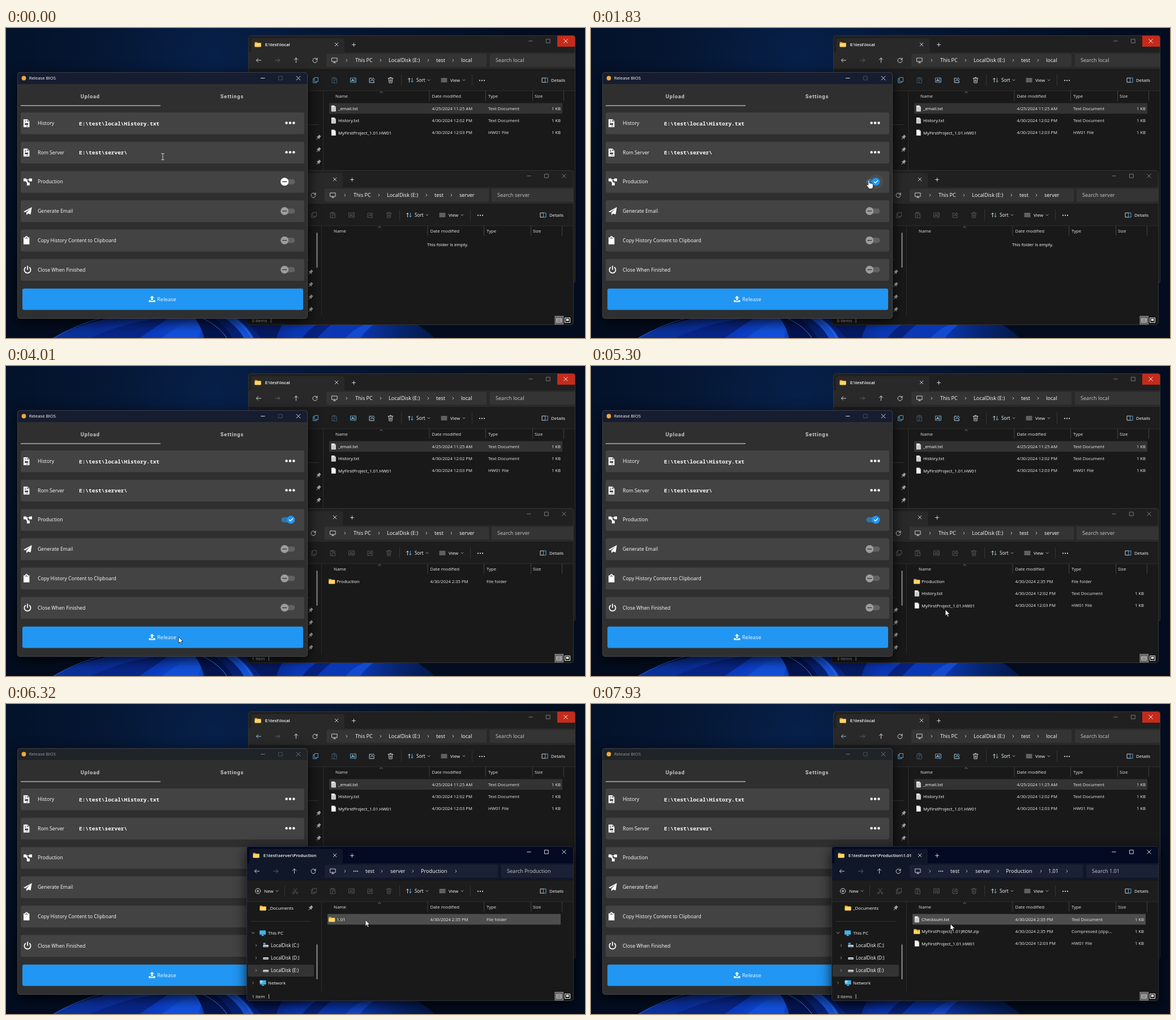
Animation, 1023 px wide and 547 px high, one loop 8000 ms. Source, as an HTML page:

```html
<!DOCTYPE html>
<html lang="en">
<head>
<meta charset="utf-8">
<title>Release tool</title>
<style>
html, body { margin: 0; width: 100%; height: 100%; overflow: hidden; background: #030c1c; }
svg { display: block; width: 1023px; height: 547px; }
text { font-family: "Open Sans", "Noto Sans", sans-serif; white-space: pre; }
.mono { font-family: "Noto Sans Mono", "DejaVu Sans Mono", monospace; font-weight: 600; }
.tab { font-family: Roboto, sans-serif; font-weight: 600; letter-spacing: .8px; }
.title { font-weight: 600; }
.shadow { filter: drop-shadow(0 6px 11px rgba(0,0,0,.8)); }
</style>
</head>
<body>
<svg viewBox="0 0 1023 547" xmlns="http://www.w3.org/2000/svg">
  <defs>
    <radialGradient id="sky" gradientUnits="userSpaceOnUse" cx="370" cy="50" r="560">
      <stop offset="0" stop-color="#07204a"/><stop offset=".35" stop-color="#051734"/><stop offset="1" stop-color="#030d1f"/>
    </radialGradient>
    <linearGradient id="bloom" gradientUnits="userSpaceOnUse" x1="85" y1="0" x2="755" y2="0">
      <stop offset="0" stop-color="#0b349c"/><stop offset=".12" stop-color="#0a2f9c"/><stop offset=".27" stop-color="#0b3dc6"/>
      <stop offset=".37" stop-color="#1150dc"/><stop offset=".44" stop-color="#06206e"/><stop offset=".52" stop-color="#06227c"/>
      <stop offset=".64" stop-color="#0a38b8"/><stop offset=".8" stop-color="#0a38b4"/><stop offset=".9" stop-color="#062674"/><stop offset="1" stop-color="#04184a"/>
    </linearGradient>
  </defs>
  <rect width="1023" height="547" fill="url(#sky)"/>
  <g id="petals"></g>
  <g id="local"></g>
  <g id="windows"><g id="server"></g><g id="app"></g></g>
  <circle id="click" r="8.6" fill="#e1dc00" fill-opacity=".56"/>
  <g id="cursor" stroke-linejoin="round"></g>
</svg>
<script>
const $ = id => document.getElementById(id);
const LOOP = 8000;
const clamp = v => Math.max(0, Math.min(1, v));

// Drawing helpers; all return SVG markup.
const rect = (x, y, w, h, fill, r = 0, extra = '') =>
  `<rect x="${x}" y="${y}" width="${w}" height="${h}" rx="${r}" fill="${fill}" ${extra}/>`;
const text = (x, y, s, size = 7.8, fill = '#fff', extra = '') =>
  `<text x="${x}" y="${y}" font-size="${size}" fill="${fill}" ${extra}>${s}</text>`;
const line = (x, y, d, color = '#e4e4e4', w = .9) =>
  `<path transform="translate(${x} ${y})" d="${d}" fill="none" stroke="${color}" stroke-width="${w}" stroke-linecap="round" stroke-linejoin="round"/>`;
const solid = (x, y, d, fill = '#fff') =>
  `<path transform="translate(${x} ${y})" d="${d}" fill="${fill}" fill-rule="evenodd"/>`;
const dots = (x, y, gap, r, fill = '#f0f0f0') =>
  [-gap, 0, gap].map(d => `<circle cx="${x + d}" cy="${y}" r="${r}" fill="${fill}"/>`).join('');

const cross = (x, y, s, c) => line(x, y, `M${-s} ${-s}L${s} ${s}M${s} ${-s}L${-s} ${s}`, c);
const right = (x, y, c, s = 2) => line(x, y, `M${-s / 2} ${-s}L${s / 2} 0L${-s / 2} ${s}`, c);
const down = (x, y, c = '#bbb', s = 2) => line(x, y, `M${-s} ${-s / 2}L0 ${s / 2}L${s} ${-s / 2}`, c, .8);
const folder = (x, y) =>
  solid(x, y, 'M-5.5-4.3H-1.6L-.3-3H5.5V4H-5.5Z', '#e3a136') + rect(x - 5.5, y - 2, 11, 6.4, '#ffd666', .8);
const page = (x, y, lines) =>
  solid(x, y, 'M-3.8-5.2H1.6L4-2.8V5.2H-3.8Z', '#f4f4f4') + line(x, y, 'M1.6-5.2V-2.8H4', '#999', .6) +
  (lines ? line(x, y, 'M-2.3-1.4H2.4M-2.3.3H2.4M-2.3 2H2.4M-2.3 3.6H2.4', '#8b8b8b', .7) : '');
const zip = (x, y) => folder(x, y) + line(x + 2, y, 'M0-3V0', '#8a6a24', 1.1);
const pin = (x, y) =>
  `<g transform="translate(${x} ${y}) rotate(42) scale(1.15)">` +
  solid(0, 0, 'M-1.8-3.8H1.8V-.8L3 1H-3L-1.8-.8Z', '#a2a2a2') + line(0, 0, 'M0 1V3.8', '#a2a2a2', .9) + '</g>';
const monitor = (x, y, c = '#ddd') => line(x, y, 'M-4.6-4H4.6V2.2H-4.6ZM-2 4.2H2M0 2.4V4', c, .9);
const screen = (x, y) => rect(x - 5.5, y - 4.5, 11, 7.6, '#3fb2ea', .8) + line(x, y, 'M-2 4.6H2M0 3V4.5', '#9ecbe2', 1);
const drive = (x, y, system) =>
  rect(x - 4.8, y - 1, 9.6, 4, '#d8dde0', 1) + rect(x - 3.6, y + 1, 7.2, .8, '#444') +
  (system ? rect(x - 4.5, y - 4.6, 4.2, 3, '#37a9ee') : '');

const PETALS = [
  ['M84 547C125 524 190 503 300 498L690 505C728 522 748 537 757 547Z', 'url(#bloom)'],
  ['M150 547C190 527 240 515 290 510L236 547Z', '#08268a'],
  ['M276 547C305 524 325 514 350 508L340 547Z', '#1250dc'],
  ['M350 547C346 530 340 520 332 510H366C382 522 394 535 400 547Z', '#041450'],
  ['M384 510C402 522 414 535 420 547H438C430 532 418 520 404 510Z', '#1552d8'],
  ['M450 547C440 534 430 524 420 514H494C486 526 480 538 478 547Z', '#051a62'],
  ['M524 547C534 533 544 525 560 518H582C566 530 556 540 550 547Z', '#07227c'],
  ['M600 547C610 536 622 527 642 520H654C640 530 630 540 626 547Z', '#134ad0']
];
$('petals').innerHTML = PETALS.map(([d, f]) => solid(0, 0, d, f)).join('') +
  line(0, 0, 'M84 547C108 533 138 520 172 511', '#1f5ae8', 1.2) +
  line(0, 0, 'M342 510C366 520 382 534 390 547M398 510C414 520 428 534 434 547', '#3b86f5', 1);

// An Explorer window, laid out at the place of the lower one.
const INACTIVE = { bar: '#202020', nav: '#292929', box: '#343434', ctl: '#858585', edge: '#3c3c3c' };
const ACTIVE = { bar: '#030a22', nav: '#101729', box: '#1a2135', ctl: '#f2f2f2', edge: '#343a4c' };

function commands(live) {
  const dim = '#5c5c5c', ink = live ? '#dedede' : dim, blue = live ? '#67b7ea' : dim;
  const y = 330;
  const arrow = 'M0-3.6V3.6';
  return line(445, y, 'M-4.6 0A4.6 4.6 0 1 1 4.6 0A4.6 4.6 0 1 1-4.6 0M-2.2 0H2.2M0-2.2V2.2') +
    text(456, 333, 'New', 8) + down(479, y) + rect(492, 320, .8, 20, '#3c3c3c') +
    line(511, y, 'M-3-4.6L1.8 2.4M3-4.6L-1.8 2.4M-1.6 3.4A1.6 1.6 0 1 1-4.8 3.4A1.6 1.6 0 1 1-1.6 3.4M4.8 3.4A1.6 1.6 0 1 1 1.6 3.4A1.6 1.6 0 1 1 4.8 3.4', dim) +
    line(544, y, 'M-1.8-4.6H4.4V2.4H-1.8ZM-2-2.4H-4.4V4.6H1.8V2.6', blue) +
    line(577, y, 'M-1.6-3.6H-4V4.8H-.6M1.6-3.6H4V-1M-1.6-4.8H1.6V-2.8H-1.6ZM0-.4H4.4V5H0Z', live ? '#3f6178' : dim) +
    line(610.5, y, 'M1-3.8H-5V3.8H1M4-3.8H5V3.8H4M2.6-5V5', blue) + line(610.5, y, 'M-3 2L-1 -2L1 2M-2.3.7H.3', ink) +
    line(643.5, y, 'M-.5-3.4H-4.4V4.4H3.8V2', ink) + line(643.5, y, 'M-2 1.5C-1.6-1 0-2 2-2V-4.4L5-1.2L2 2V-.2C.4-.2-1 .3-2 1.5Z', blue) +
    line(676.5, y, 'M-4.4-3.4H4.4M-3.4-3.4L-2.6 4.8H2.6L3.4-3.4M-1.2-3.4V-4.8H1.2V-3.4M-.9-1V2.6M.9-1V2.6', ink) +
    rect(695, 320, .8, 20, '#3c3c3c') +
    line(709.5, y, arrow + 'M-2-1.6L0-3.6L2-1.6') + line(714.5, y, arrow + 'M-2 1.6L0 3.6L2 1.6', '#67b7ea') +
    text(722, 333, 'Sort', 8.2) + down(744, y) +
    line(771, y, 'M-5-3H5M-5-1H5M-5 1H5M-5 3H5', '#dedede', .7) + text(782, 333, 'View', 7.9) + down(806, y) +
    rect(820, 320, .8, 20, '#3c3c3c') + dots(838, 330.5, 4, 1.1) +
    line(949, y, 'M.6-3.8H-5V3.8H.6') + line(949, y, 'M1-3.8H5V3.8H1Z', '#67b7ea') + text(960, 333, 'Details', 7.9);
}

const ICONS = { folder, zip, txt: (x, y) => page(x, y, true), file: (x, y) => page(x, y, false) };

function fileRow([kind, name, date, type, size = ''], i) {
  const y = 380 + i * 21.3;
  return ICONS[kind](575.7, y) + text(584, y + 2.9, name, kind === 'folder' ? 7.95 : 7.75) +
    text(749.5, y + 2.8, date, 7.67, '#ececec') + text(849, y + 2.8, type, 7.8, '#ececec') +
    text(977, y + 2.8, size, 7.7, '#ececec', 'text-anchor="end"');
}

function quickSide(pinX) {
  const names = ['Desktop', 'Downloads', 'Documents', 'Pictures'];
  return text(463, 363, 'Home', 7.8) + screen(453, 360) + text(463, 385, 'Gallery', 7.8) + screen(453, 382) +
    rect(431, 408, pinX - 431, .8, '#3a3a3a') +
    names.map((n, i) => folder(453, 431 + i * 22) + text(463, 434 + i * 22, n, 7.8) + pin(pinX, 431 + i * 22)).join('');
}

function treeSide() {
  const disks = ['C', 'D', 'E'].map((d, i) => {
    const y = 426 + i * 22;
    return right(442, y, '#999') + drive(459, y, !i) + text(468, y + 3, `LocalDisk (${d}:)`, 8.1);
  });
  return folder(454, 360) + text(463, 363, '_Documents', 7.75) + pin(538, 360) +
    rect(432, 383, 106, .8, '#3a3a3a') + rect(427, 460, 117, 21, '#333', 2) +
    down(436.5, 404, '#ccc', 2.4) + screen(453.5, 404) + text(463, 407, 'This PC', 7.95) + disks.join('') +
    right(436.5, 492, '#999') + screen(454, 492) + `<circle cx="451" cy="490" r="2.6" fill="#8fd8ff"/>` +
    text(463, 495, 'Network', 7.8);
}

function explorer(o) {
  const c = o.active ? ACTIVE : INACTIVE, ctl = c.ctl;
  const bottom = 251 + o.h;
  const chev = o.chev.map(x => right(x, 295, '#ccc')).join('');
  const heads = [[579, 'Name'], [749.5, 'Date modified'], [849, 'Type'], [931, 'Size']];
  return rect(425, 251, 578, o.h, '#191919', 5, o.active ? 'class="shadow"' : '') +
    solid(0, 0, 'M425 282V256Q425 251 430 251H998Q1003 251 1003 256V282Z', c.bar) +
    (o.danger ? solid(0, 0, 'M971 251H998Q1003 251 1003 256V271H971Z', '#c42b1c') : '') +
    solid(0, 0, 'M430 282V260Q430 256 434 256H591Q595 256 595 260V282Z', c.nav) + rect(425, 281, 578, 30, c.nav) +
    rect(425, 311, 578, 38, '#1d1d1d') + rect(425, 310.6, 578, .8, '#161616') + rect(425, 348.4, 578, .8, '#333') +
    folder(442, 267) + text(454.7, 270.2, o.title, 7.7, '#fff', 'class="title"') + cross(581, 267, 2.8, '#e4e4e4') +
    line(611.5, 267.5, 'M-3 0H3M0-3V3') +
    line(924, 261, 'M-3.3 0H3.3', ctl) + line(955, 261, 'M-3.2-3.2H3.2V3.2H-3.2Z', ctl) + cross(986, 261, 3.3, o.danger ? '#fff' : ctl) +
    line(443.5, 295, 'M4 0H-4M-1-3.2L-4.2 0L-1 3.2', o.back) + line(476.5, 295, 'M-4 0H4M1-3.2L4.2 0L1 3.2', '#666') +
    line(509.5, 295, 'M0 4V-4M-3.2-1L0-4.2L3.2-1') +
    line(543, 295, 'M3.8-1.2A4 4 0 1 0 4 .8M4-4V-1.2H1.2', o.refresh) +
    rect(563, 283.5, o.end - 563, 23, c.box, 2) + rect(o.find, 283.5, 1003 - o.find, 23, c.box, 2) +
    monitor(577.5, 295) + chev + (o.more ? dots(618, 295, 3.2, .9) : '') +
    o.crumbs.map(([x, s]) => text(x, 298.3, s, 9.1)).join('') +
    text(o.find + 10, 298.3, o.search, 9.1, '#c8c8c8') +
    commands(o.live) + rect(557, 349, .8, bottom - 366, '#333') +
    heads.map(([x, s]) => text(x, 360.8, s, 7.8, '#e8e8e8')).join('') +
    [744.5, 844, 927, 982].map(x => rect(x, 349, .8, 17.5, '#4b4b4b')).join('') +
    line(660, 351.3, 'M-2.4 1.2L0-1.2L2.4 1.2', '#aaa', .7) +
    (o.hover ? rect(568, 370.5, 412, 18.8, o.hover) : '') +
    o.rows.map(fileRow).join('') +
    (o.rows.length ? '' : text(744, 385, 'This folder is empty.', 7.76)) +
    (o.tree ? treeSide() : quickSide(o.bar ? 538 : 549)) +
    (o.bar ? rect(548.6, o.bar, 1.8, 62, '#9a9a9a', .9) : '') +
    rect(426, bottom - 17, 576, 16, '#191919') + text(434.5, 518.8, o.status, 7.85, '#e8e8e8') +
    rect(o.status[0] === '1' ? 464 : 467.6, 512, .9, 8, '#cfcfcf') +
    rect(970, 508.5, 14.5, 14.5, '#5d5d5d', 0, 'stroke="#a5a5a5" stroke-width=".8"') +
    line(977.2, 515.8, 'M-4-3.6H4V3.6H-4ZM-4-1.2H4M-4 1.2H4', '#eee', .8) +
    rect(987.5, 511.5, 9, 8, '#111', 0, 'stroke="#eee" stroke-width="1"') + rect(989.5, 513.2, 5, 3.6, '#eee') +
    rect(425.4, 251.4, 577.2, o.h - .8, 'none', 5, `stroke="${c.edge}" stroke-width=".8"`);
}

const HW = ['file', 'MyFirstProject_1.01.HW01', '4/30/2024 12:03 PM', 'HW01 File', '1 KB'];
const HISTORY = ['txt', 'History.txt', '4/30/2024 12:02 PM', 'Text Document', '1 KB'];
const made = (kind, name, type, size) => [kind, name, '4/30/2024 2:35 PM', type, size];
const PROD = made('folder', 'Production', 'File folder');
const LISTS = [
  [], [PROD], [PROD, HISTORY, HW], [made('folder', '1.01', 'File folder')],
  [made('txt', 'Checksum.txt', 'Text Document', '1 KB'), made('zip', 'MyFirstProject(1.01)ROM.zip', 'Compressed (zipp...', '1 KB'), HW]
];
const ROOT = [[614, 'This PC'], [673, 'LocalDisk (E:)'], [757, 'test']];
const DEEP = [[635, 'test'], [679, 'server'], [733, 'Production']];

function drawLocal(back) {
  $('local').innerHTML = '<g transform="translate(3 -238)">' + explorer({
    h: 438, danger: true, live: true, title: 'E:\\test\\local', back, refresh: '#e4e4e4',
    end: 846, find: 852, search: 'Search local', crumbs: [...ROOT, [801, 'local']], chev: [599, 659, 743, 787],
    hover: '#333', rows: [['txt', '_email.txt', '4/25/2024 11:25 AM', 'Text Document', '1 KB'], HISTORY, HW], status: '3 items'
  }) + '</g>';
}

function drawServer(step, active, hover, refresh) {
  const deep = step > 2, last = step === 4, n = LISTS[step].length;
  $('server').innerHTML = explorer({
    h: 273, active, refresh, hover: hover && '#4d4d4d', back: '#e4e4e4', rows: LISTS[step],
    title: 'E:\\test\\server' + (deep ? '\\Production' : '') + (last ? '\\1.01' : ''),
    end: deep ? 869 : 853, find: deep ? 875 : 858, more: deep,
    search: 'Search ' + (last ? '1.01' : deep ? 'Production' : 'server'),
    crumbs: deep ? [...DEEP, ...(last ? [[808, '1.01']] : [])] : [...ROOT, [801, 'server']],
    chev: deep ? [599, 664, 719, 795, ...(last ? [841] : [])] : [599, 659, 743, 787],
    tree: deep, bar: deep ? 424 : 361, status: n + (n === 1 ? ' item' : ' items')
  });
}

// The release tool window.
const form = 'M-5.2-7H1.6L5.2-3.4V7H-5.2ZM1.2-6V-3H4.4ZM-3.2-4.8V-4H-.4V-4.8ZM-3.2-2.6V-1.8H-.4V-2.6ZM-3 0V3H3V0ZM-.6 4.6V5.4H3V4.6Z';
const LABELS = ['History', 'Rom Server', 'Production', 'Generate Email', 'Copy History Content to Clipboard', 'Close When Finished'];
const GLYPHS = [
  y => solid(36.2, y, form),
  y => solid(36.2, y, form),
  y => solid(38.5, y, 'M-7.5-6H-2.4V-4.2H2.4V-6H7.5V-1H2.4V-2.8H-1.6L1.2 1.4H3.4V6.4H-1.6V1.6L-4-1H-7.5Z'),
  y => solid(38.3, y, 'M7.4-7.2L5.2 6L.6 4.2L-1.8 7.2L-2.4 3L4.6-4.4L-4 2.2L-7.4.8Z'),
  y => solid(36.2, y, 'M-5.2-5.4H-2.4A2.4 2.4 0 0 1 2.4-5.4H5.2V7H-5.2ZM-.9-5.4A.9.9 0 0 0 .9-5.4A.9.9 0 0 0-.9-5.4ZM-2.4-3.6V-2.8H2.4V-3.6Z'),
  y => line(38, y, 'M-3.6-4A5.6 5.6 0 1 0 3.6-4M0-6.4V-.4', '#fff', 1.7)
];
const thumb = (x, y, fill, mark) => `<circle cx="${x}" cy="${y}" r="7" fill="${fill}"/>` + mark;

function toggle(y, on, k, first) {
  const x = 492.2 + 11.2 * k;
  return rect(486.5, y - 4.6, 24, 9.2, on ? '#2f75ad' : '#626262', 4.6) +
    (on ? thumb(x, y, '#2196f3', line(x, y, 'M-3 .2L-.9 2.3L3.2-2', '#fff', 1.4))
        : thumb(x, y, first ? '#fff' : '#9d9d9d', line(x, y, 'M-3.4 0H3.4', '#3d3d3d', 1.5)));
}

function drawApp(focus) {
  const ink = focus ? '#f2f2f2' : '#858585';
  const rows = LABELS.map((s, i) => {
    const y = 168 + i * 51.7;
    return rect(26, y - 19, 501, 38.4, '#434343', 3) + GLYPHS[i](y) + text(56, y + 3, s, 8.73, '#fff') +
      (i < 2 ? dots(502, y - .5, 6.4, 2.2, '#fff') : i > 2 ? toggle(y - .1, false, 0) : '');
  }).join('');
  $('app').innerHTML =
    rect(20, 78, 513, 435, '#2f2f2f', 5, 'class="shadow"') +
    solid(0, 0, 'M20 99V83Q20 78 25 78H528Q533 78 533 83V99Z', focus ? '#171d30' : '#202327') +
    '<circle cx="31.5" cy="88.5" r="3.9" fill="#f2a93b"/>' + text(40.7, 91.3, 'Release BIOS', 7.75, focus ? '#fff' : '#9a9a9a') +
    line(453.7, 88.5, 'M-3.3 0H3.3', ink) + line(485, 88.5, 'M-3.2-3.2H3.2V3.2H-3.2Z', '#505358') + cross(516.5, 88.5, 3.4, ink) +
    text(131.8, 124, 'Upload', 9.3, '#c9c9c9', 'class="tab"') + text(378.8, 124, 'Settings', 9.3, '#c9c9c9', 'class="tab"') +
    rect(26, 136.3, 247, 1.3, '#a9cfbc') + rows +
    text(129, 171.6, 'E:\\test\\local\\History.txt', 9.47, '#fff', 'class="mono"') +
    text(129, 223.2, 'E:\\test\\server\\', 9.47, '#fff', 'class="mono"') +
    rect(29, 459.8, 496, 37.8, '#2196f3', 3, 'id="button"') +
    solid(258, 478.5, 'M0-6L4-2H1.3V2H-1.3V-2H-4ZM-5.6 1.8H-2.4V3.2H2.4V1.8H5.6V5H-5.6Z') +
    text(267, 482, 'Release', 9.45, '#f3f9ff') + '<g id="prod"></g>' +
    rect(20.4, 78.4, 512.2, 434.2, 'none', 5, 'stroke="#484b52" stroke-width=".8"');
}

function drawProd(on, k, halo) {
  $('prod').innerHTML = (halo ? `<circle cx="${492.2 + 11.2 * k}" cy="271.3" r="13" fill="#fff" fill-opacity=".05"/>` : '') +
    toggle(271.3, on, k, true);
}

// Pointer: [time, x, y], straight runs between the points; E marks an eased run.
const E = true;
const PATH = [
  [0, 277, 227], [660, 277, 227], [1420, 485, 267, E], [1560, 491, 269], [1900, 491, 269], [2260, 433, 416, E],
  [2760, 305, 478, E], [4690, 305, 478], [4890, 567, 480, E], [5100, 567, 480], [5300, 626, 430], [5400, 633, 408],
  [5580, 635, 381], [7900, 635, 381], [7930, 635, 388], [LOOP, 635, 388]
];
const CLICKS = [[1600, 1740], [2880, 3020], [5980, 6050], [6120, 6190], [7110, 7180], [7250, 7320]];
const edge = 'fill="#fff" stroke="#111" stroke-width=".8"';
const SHAPES = {
  beam: line(0, 0, 'M-2.2-5.5H-.6L0-5L.6-5.5H2.2M-2.2 5.5H-.6L0 5L.6 5.5H2.2M0-5V5', '#e8e8e8', .9),
  arrow: `<path d="M0 0V11L2.5 8.7L4.3 12.8L6.1 12L4.4 8H7.9Z" ${edge}/>`,
  hand: `<path d="M-1.3 8.3V.8C-1.3-.8 1.1-.8 1.1.8V5.2C1.2 4.2 3 4.2 3.2 5.4C3.6 4.6 5.2 4.8 5.4 6C5.9 5.4 7.4 5.6 7.4 7.2V10.5C7.4 12.6 6.2 14 5.6 14.8H.4C-.8 13-3 10.6-4 9C-4.6 7.6-3 7-2.3 7.6Z" ${edge}/>`
};

function pointer(t) {
  const i = PATH.findIndex(p => p[0] > t);
  const [t0, x0, y0] = PATH[i - 1], [t1, x1, y1, ease] = PATH[i];
  let k = (t - t0) / (t1 - t0);
  if (ease) k = k * k * (3 - 2 * k);
  return [x0 + (x1 - x0) * k, y0 + (y1 - y0) * k];
}

// Redraw a part only when its state differs from the last one.
const seen = {};
function sync(name, draw, ...state) {
  const key = state.join();
  if (seen[name] === key) return;
  seen[name] = key;
  draw(...state);
}

function update(t) {
  const [x, y] = pointer(t);
  const press = t >= 5980, front = t >= 6050;
  const step = [4010, 4140, 6320, 7390].filter(s => t >= s).length;
  const overButton = t > 2300 && t < 3020 && y > 460;

  sync('local', drawLocal, press ? '#b4d0e8' : '#e4e4e4');
  sync('server', drawServer, step, front, t > 5300 && y < 390, press && !front ? '#8dbbe0' : '#e4e4e4');
  sync('app', drawApp, !press);
  // The switch lives inside the app group, so it is redrawn with it.
  sync('prod', (on, k, halo) => drawProd(on, k, halo), t >= 1620, clamp((t - 1620) / 150), t > 1450 && t < 1960, press);
  sync('order', f => $('windows').append(f ? $('server') : $('app')), front ? 1 : '');
  $('button').setAttribute('fill', overButton ? '#1a6cb3' : '#2196f3');

  const shape = t < 900 ? 'beam' : t >= 1420 && t < 1960 || t > 2300 && t < 3150 && y > 460 ? 'hand' : 'arrow';
  sync('cursor', s => { $('cursor').innerHTML = SHAPES[s]; }, shape);
  $('cursor').setAttribute('transform', `translate(${x} ${y})`);
  $('click').setAttribute('transform', `translate(${x - .5} ${y - .5})`);
  $('click').setAttribute('visibility', CLICKS.some(([a, b]) => t >= a && t < b) ? 'visible' : 'hidden');
}

const start = performance.now();
function frame() {
  update((performance.now() - start) % LOOP);
  requestAnimationFrame(frame);
}
update(0);
requestAnimationFrame(frame);
</script>
</body>
</html>
```
